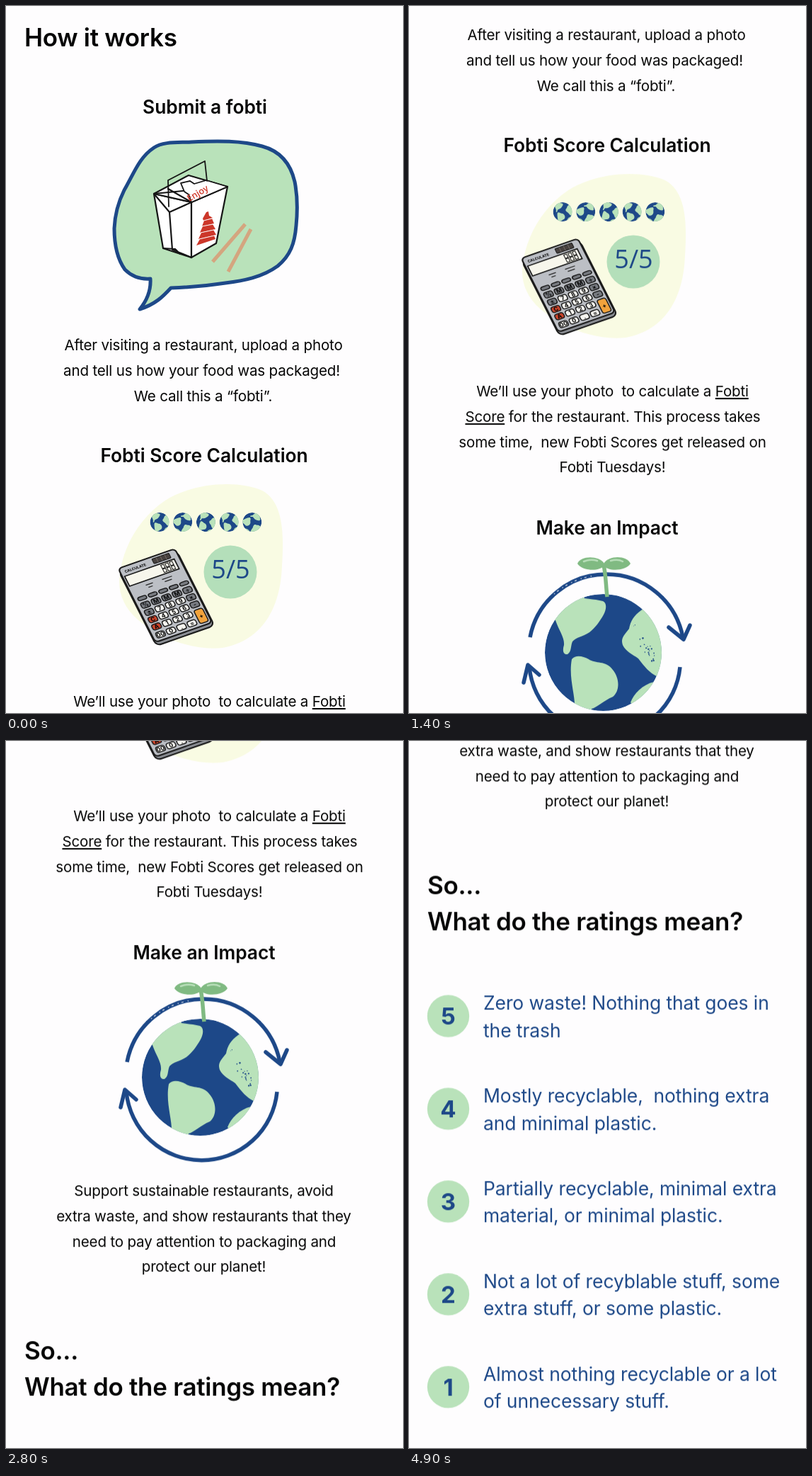
An HTML page for the animation above (5 s loop, 561 by 998 pixels).

```html
<!DOCTYPE html>
<html lang="en">
<head>
<meta charset="utf-8">
<title>How it works</title>
<style>
  :root { --navy: #1d4888; --green: #b9e2ba; --leaf: #80ba82; }
  html, body { margin: 0; width: 100%; height: 100%; overflow: hidden; background: #fefdfe; }
  .stage { position: relative; width: 561px; height: 998px; overflow: hidden; }
  .page { display: block; position: absolute; left: 0; top: 0; animation: scroll 5s steps(50) infinite; will-change: transform; }
  @keyframes scroll { to { transform: translateY(-1564px); } }

  text { font-family: Inter, "Open Sans", sans-serif; font-optical-sizing: none; fill: #060606; }
  .h1 { font-size: 35px; font-weight: 600; letter-spacing: -.3px; }
  .h2 { font-size: 26.4px; font-weight: 600; letter-spacing: -.05px; text-anchor: middle; }
  .body { font-size: 20.6px; letter-spacing: -.2px; text-anchor: middle; }
  .link { text-decoration: underline; text-decoration-thickness: 1px; text-underline-offset: 3px; }
  .rating { font-size: 26.5px; letter-spacing: -.1px; fill: var(--navy); }
  .digit { font-size: 33px; font-weight: 700; text-anchor: middle; fill: var(--navy); }
  .score { font-family: "Open Sans", sans-serif; font-size: 36px; text-anchor: middle; fill: var(--navy); }
  .enjoy { font-family: "Open Sans", sans-serif; font-size: 12.5px; font-weight: 600; text-anchor: middle; fill: #d0392b; }
  .tiny { font-size: 5px; font-weight: 700; }
  .key { font-size: 8px; font-weight: 700; text-anchor: middle; }
  .navy { fill: var(--navy); }
  .green { fill: var(--green); }
  .pen { fill: none; stroke: var(--navy); stroke-linecap: round; stroke-linejoin: round; }
  .ink { fill: #fff; stroke: #151515; stroke-width: 2.2; stroke-linejoin: round; stroke-linecap: round; }
</style>
</head>
<body>
<div class="stage">
<svg class="page" width="561" height="2562" viewBox="0 0 561 2562">
  <defs>
    <clipPath id="disc"><circle cx="274.5" cy="787.5" r="82.5"/></clipPath>
    <g id="globe" clip-path="url(#disc)">
      <circle class="navy" cx="274.5" cy="787.5" r="82.5"/>
      <g class="green">
        <path d="M198 738L240 700L248 711C256 712 266 713 274 715C280 718 279 726 275 734C270 743 263 753 255 759C246 765 236 766 231 772C228 779 230 786 224 790C217 791 217 783 219 777C220 766 212 757 207 742Z"/>
        <path d="M328 728C318 735 313 743 311 754C303 764 299 768 302 777C307 787 316 790 324 796C333 808 340 816 350 821L368 805V740L340 720Z"/>
        <path d="M230 797C236 790 246 793 254 797C264 804 278 798 288 812C298 824 298 842 288 850C274 856 266 865 258 867L254 880L234 870C236 848 225 825 230 797Z"/>
        <path d="M346 829C330 833 318 845 313 858L330 880L368 840Z"/>
      </g>
    </g>
  </defs>

  <text class="h1" x="26" y="57">How it works</text>
  <text class="h2" x="281" y="152">Submit a fobti</text>

  <!-- Speech bubble -->
  <path class="pen" style="fill:var(--green)" stroke-width="5" d="M153 314C154 292 160 274 167 260C181 236 188 214 209 200C222 191 243 193 262 192C300 190 333 190 362 198C388 205 402 222 408 248C412 268 412 290 410 310C408 335 402 352 384 367C362 383 335 388 310 391C284 395 258 397 233 398C222 410 211 421 189 428C199 416 205 402 204 385C190 386 178 382 168 372C158 358 153 338 153 314Z"/>
  <path d="M338 308L292 361M346 315L314 375" stroke="#d4a57f" stroke-width="5" fill="none"/>

  <!-- Takeaway box -->
  <g class="ink">
    <path d="M209 265L262 277V355L222 342Z"/>
    <path d="M262 277L313 255L297 335L262 355Z"/>
    <path d="M209 265L258 239L313 255L262 277Z"/>
    <path d="M231 291L209 265M231 291L262 277M231 291L235 344L262 355M222 342L239 343L246 350M209 265L250 261M229 258L262 277" fill="none"/>
    <path d="M247 250L260 247L266 251L283 246L313 255L262 277L258 266L252 262Z" stroke-width="1.8"/>
    <path d="M230 283L229 246L281 219L284 247" fill="none" stroke-width="1.8"/>
  </g>
  <text class="enjoy" transform="translate(273 268) rotate(-31)">Enjoy</text>
  <g fill="#cc372a">
    <path d="M283 291L286 290L287 296L292 299L279 303L278 300Z"/>
    <path d="M280 303L291 300L294 307L277 311Z"/>
    <path d="M278 311L292 308L296 315L274 320Z"/>
    <path d="M276 320L293 316L297 323L272 329Z"/>
    <path d="M274 329L294 324L296 329L269 338Z"/>
  </g>
  <path d="M279 303L291 300M277 311L293 308M275 320L294 316M273 329L295 324" stroke="#fff" stroke-width=".9"/>

  <text class="body" x="279" y="486">After visiting a restaurant, upload a photo</text>
  <text class="body" x="276.5" y="522">and tell us how your food was packaged!</text>
  <text class="body" x="278.5" y="557.5">We call this a “fobti”.</text>

  <text class="h2" x="280" y="644">Fobti Score Calculation</text>

  <!-- Score picture -->
  <path fill="#f9fbe3" d="M160 812C162 770 185 725 225 698C262 674 325 668 362 684C392 700 393 745 390 790C388 850 362 896 306 906C262 911 214 890 186 866C168 850 160 832 160 812Z"/>
  <g id="globes"></g>
  <circle cx="317" cy="799" r="37.5" fill="#b4dfba"/>
  <text class="score" x="317.5" y="808">5/5</text>

  <!-- Calculator -->
  <g transform="matrix(1 -.35 .47 .93 159 795)">
    <rect x="-1" y="3" width="82" height="113" rx="7" fill="#8b8e94" stroke="#1b1b1b" stroke-width="2"/>
    <rect x="0" y="-1" width="80" height="112" rx="5" fill="#bcbfc5" stroke="#1b1b1b" stroke-width="2"/>
    <rect x="46" y="2" width="24" height="7" rx="1" fill="#47413f" stroke="#1b1b1b"/>
    <path d="M52 2v7M58 2v7M64 2v7" stroke="#8a8078" stroke-width=".6"/>
    <text class="tiny" x="6" y="8">CALCULATE</text>
    <rect x="3" y="12" width="70" height="15" fill="#f7f6ec" stroke="#1b1b1b" stroke-width="1.6"/>
    <path d="M53 14h4v5h-4zM59 14h4v5h-4zM65 14h4v5h-4zM53 20h4v5h-4zM59 20h4v5h-4zM65 20h4v5h-4z" fill="none" stroke="#1b1b1b"/>
    <path d="M23 33h10M46 33h14M25 37h6M48 37h10" stroke="#2b2b2b" stroke-width="1.2"/>
    <g id="keys"></g>
  </g>

  <text class="body" x="287.5" y="989">We’ll use your photo&nbsp; to calculate a <tspan class="link">Fobti</tspan></text>
  <text class="body" x="288" y="1025"><tspan class="link">Score</tspan> for the restaurant. This process takes</text>
  <text class="body" x="287.5" y="1060.5">some time,&nbsp; new Fobti Scores get released on</text>
  <text class="body" x="287.5" y="1096">Fobti Tuesdays!</text>

  <text class="h2" x="280" y="1184">Make an Impact</text>

  <!-- Earth with sprout -->
  <g transform="translate(0 563)">
    <use href="#globe"/>
    <g id="specks" class="navy"></g>
    <g class="pen" stroke-width="5.5">
      <path d="M171 766A110 110 0 0 1 387 766" stroke-linecap="butt"/>
      <path d="M367 752L388 769L397 749"/>
      <path d="M383 808A107 107 0 0 1 170 808" stroke-linecap="butt"/>
      <path d="M162 830L168 805L184 819"/>
    </g>
    <path d="M205 705A110 110 0 0 1 262 679" fill="none" stroke="#fefdfe" stroke-width="1.6" stroke-dasharray="1.5 4 3 6" opacity=".65"/>
    <path d="M275 664C278 676 278 690 280 709" fill="none" stroke="#80ba82" stroke-width="5.5"/>
    <g fill="#80ba82">
      <path d="M276 665C268 674 244 672 238 662C242 651 268 650 276 662Z"/>
      <path d="M275 665C282 674 307 672 313 662C308 650 282 650 275 662Z"/>
    </g>
    <path d="M247 659Q257 655 266 658M285 658Q295 655 302 659" fill="none" stroke="#b9dfba" stroke-width="2.5" stroke-linecap="round"/>
  </g>

  <text class="body" x="279.5" y="1518">Support sustainable restaurants, avoid</text>
  <text class="body" x="279.5" y="1554">extra waste, and show restaurants that they</text>
  <text class="body" x="280" y="1589.5">need to pay attention to packaging and</text>
  <text class="body" x="279.5" y="1625">protect our planet!</text>

  <text class="h1" x="26" y="1749">So...</text>
  <text class="h1" x="26" y="1799.5">What do the ratings mean?</text>
  <g id="ratings"></g>
</svg>
</div>
<script>
  const fill = (id, html) => { document.getElementById(id).innerHTML = html; };

  const ratings = [
    ["Zero waste! Nothing that goes in", "the trash"],
    ["Mostly recyclable,\u00a0 nothing extra", "and minimal plastic."],
    ["Partially recyclable, minimal extra", "material, or minimal plastic."],
    ["Not a lot of recyblable stuff, some", "extra stuff, or some plastic."],
    ["Almost nothing recyclable or a lot", "of unnecessary stuff."]
  ];
  fill("ratings", ratings.map(([top, bottom], i) => `
    <g transform="translate(0 ${1921 + i * 130.9})">
      <circle class="green" cx="55.5" cy="0" r="29.7"/>
      <text class="digit" x="55.5" y="12">${5 - i}</text>
      <text class="rating" x="105" y="-9">${top}</text>
      <text class="rating" x="105" y="29.7">${bottom}</text>
    </g>`).join(""));

  const turns = [0, 75, 20, 0, 75];
  fill("globes", turns.map((turn, i) =>
    `<use href="#globe" transform="translate(${217 + i * 32.7} 728.5) rotate(${turn}) scale(.163) translate(-274.5 -787.5)"/>`
  ).join(""));

  // Calculator keys, row by row; empty cells sit under the tall plus key.
  const grey = "#777a80", white = "#f6f5f0", red = "#c8432a";
  const rows = [
    [48, 5, ["", "", "", "", ""]],
    [58, 8, ["%", "M", "M", "M", "÷"]],
    [69, 8, ["±", "7", "8", "9", "×"]],
    [80, 8, ["C", "4", "5", "6", "-"]],
    [91, 8, ["A", "1", "2", "3", null]],
    [103, 8, ["00", "0", ".", "=", null]]
  ];
  const tone = (r, c) => (r === 3 || r === 4) && c === 0 ? red : r < 2 || c === 4 || (r === 2 && c === 0) ? grey : white;
  const key = (x, y, h, color, label) =>
    `<rect x="${x - 6}" y="${y - h / 2}" width="12" height="${h}" rx="3" fill="${color}" stroke="#1b1b1b" stroke-width="1.4"/>
     <text class="key" x="${x}" y="${y + 2.8}">${label}</text>`;
  fill("keys", rows.map(([y, h, labels], r) => labels.map((label, c) =>
    label === null ? "" : key(11 + c * 14.8, y, h, tone(r, c), label)).join("")).join("")
    + key(71, 97.5, 20, "#f2a33c", "+"));

  // Chalky specks on the eastern continent
  let seed = 7;
  const rand = () => (seed = seed * 16807 % 2147483647) / 2147483647;
  fill("specks", Array.from({ length: 26 }, () => {
    const t = rand();
    return `<circle cx="${312 + t * 30 + rand() * 8}" cy="${752 + t * 46 + rand() * 16 - 8}" r="${0.4 + rand() * 0.9}"/>`;
  }).join(""));
</script>
</body>
</html>
```
